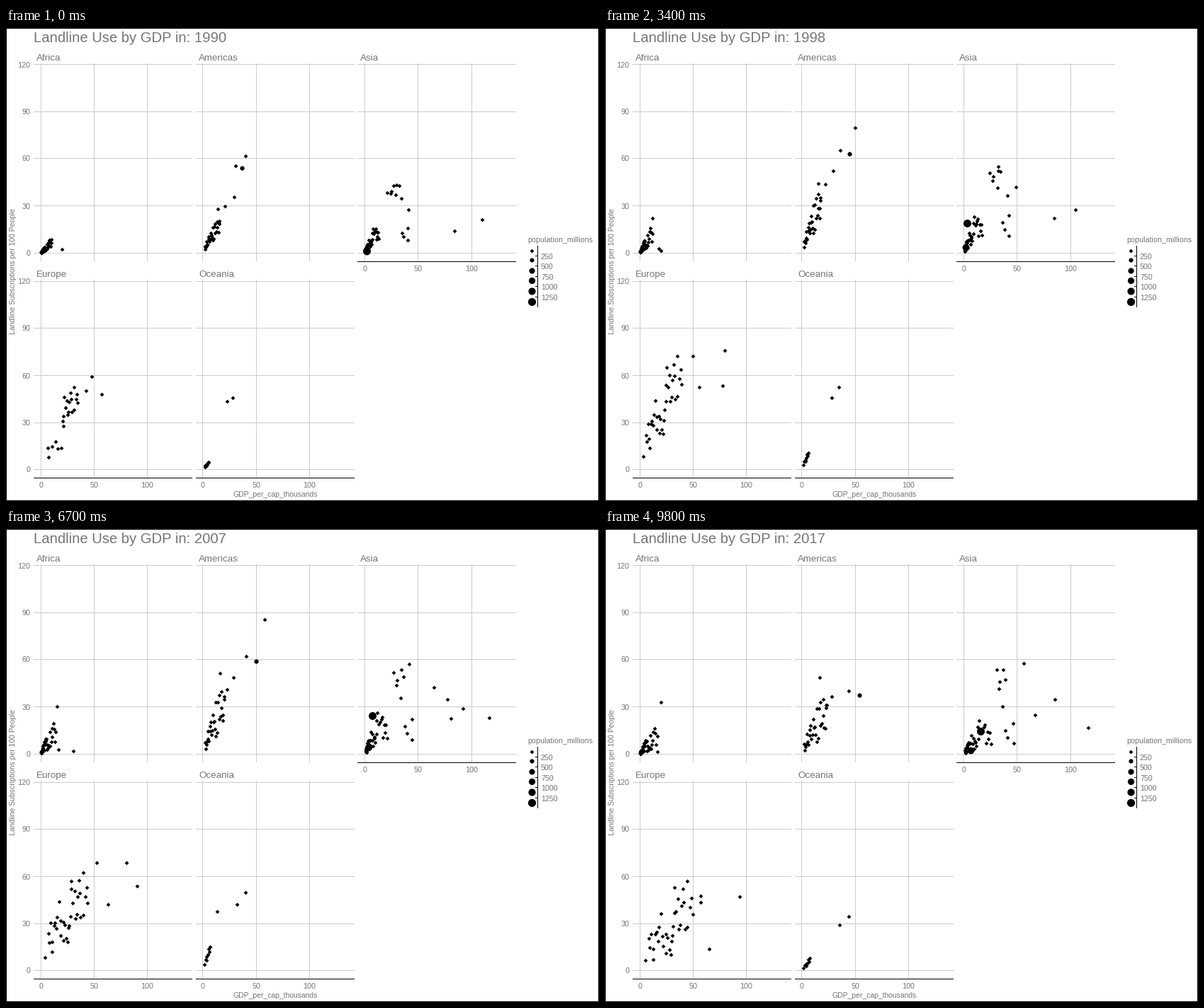
Recreate the animation shown at these times as a matplotlib script. Size 837x669 px, loop 10 s.

```python
import numpy as np
import matplotlib.pyplot as plt
from matplotlib.animation import FuncAnimation

W, H, DPI = 837, 669, 64
PX = 72 / DPI
GREY, GRID = "#757575", "#cccccc"
X_SCALE, Y_SCALE = 1.505, 2.222
KEY_YEARS = (1990, 1998.5, 2007, 2017)

# Left edge, top edge, x of zero GDP, y of zero lines, has an x axis
PANELS = {
    "Africa": (39, 50, 49.2, 318.05, False),
    "Americas": (268, 50, 277.8, 318.05, False),
    "Asia": (496, 50, 506.6, 318.05, True),
    "Europe": (39, 356, 49.2, 624.9, True),
    "Oceania": (268, 356, 277.8, 624.9, True),
}


def year_at(frame):
    """Hold each year, with one half-way step before the next."""
    if frame < 70:
        return 1990 + (frame + 2) // 4 - 0.5 * (frame % 4 == 2)
    step, part = divmod(frame - 70, 3)
    return 2008 + step - 0.5 * (part == 0)


def progress(year):
    return (year - 1990) / 27


def cloud(panel, seed, n, gdp, level, spread, power=1.0, first=1990):
    """Countries whose landlines level off with GDP.

    gdp is the range (low, high) in 1990 and in 2017; level is the
    ceiling of landlines in each key year.
    """
    rng = np.random.default_rng(seed)
    rank = ((np.arange(n) + rng.random(n)) / n) ** power
    luck = rng.uniform(-1, 1, n)
    (low0, high0), (low1, high1) = gdp

    def positions(year):
        p = progress(year)
        low, high = low0 + (low1 - low0) * p, high0 + (high1 - high0) * p
        x = low + (high - low) * rank
        y = np.interp(year, KEY_YEARS, level) * (1 - np.exp(-x / 15))
        return x, y * (1 + (spread + 0.25 * p) * luck)

    return panel, first, 2017, positions


def path(panel, start, middle, end, first=1990, last=2017):
    """One country on a parabola through its places in 1990, 2004 and 2017."""
    curve = np.polyfit([0, 14, 27], [start, middle, end], 2)

    def positions(year):
        t = year - 1990
        return curve[0] * t * t + curve[1] * t + curve[2]

    return panel, first, last, positions


SMALL = [
    cloud("Africa", 3, 44, ((0.6, 10), (0.8, 17)), (13, 21, 22, 16), 0.5, 2.6),
    path("Africa", (10, 9), (14, 28), (20, 33)),
    path("Africa", (20, 2.5), (17, 3), (16.5, 1.4)),
    path("Africa", (2, 0.5), (28, 1.8), (34, 1.8), last=2015),

    cloud("Americas", 5, 30, ((2.2, 16), (2.5, 24)), (26, 42, 40, 31), 0.35, 1.3),
    cloud("Americas", 2, 3, ((14, 31), (20, 29)), (38, 54, 49, 36), 0.2),
    path("Americas", (14.5, 28), (16, 50), (17, 49)),
    path("Americas", (31, 55.5), (39.5, 65), (44, 40.5)),
    path("Americas", (40.5, 62), (55.5, 85), (66, 78), last=2012),

    cloud("Asia", 7, 34, ((1.2, 14), (1.5, 27)), (26, 31, 29, 20), 0.5, 1.9),
    cloud("Asia", 1, 6, ((20, 34), (30, 40)), (48, 57, 53, 50), 0.1),
    cloud("Asia", 4, 4, ((33, 43), (36, 50)), (13, 19, 17, 14), 0.5),
    path("Asia", (27, 43), (38, 56), (56.5, 58)),
    path("Asia", (34.5, 35), (59, 43), (85.5, 35)),
    path("Asia", (110, 21.6), (97.6, 29), (67, 25)),
    path("Asia", (84, 14), (83, 23.5), (70, 14), last=2016),
    path("Asia", (41, 27.5), (60.5, 37), (168, 18.4), last=2014),
    path("Asia", (104, 34), (116, 25), (117, 17), first=2000),

    cloud("Europe", 6, 16, ((20, 35), (30, 50)), (52, 66, 53, 45), 0.22),
    cloud("Europe", 9, 7, ((4.5, 22), (8, 33)), (30, 52, 46, 30), 0.35),
    cloud("Europe", 8, 13, ((2, 20), (5, 32)), (34, 54, 47, 34), 0.3, first=1992),
    path("Europe", (57.5, 48.5), (87, 54.6), (94, 47.5)),
    path("Europe", (43, 50.5), (61.5, 47.7), (65, 14)),
    path("Europe", (48, 59.7), (51.5, 72), (57.5, 44)),
    path("Europe", (60, 74), (82.5, 72.5), (57.5, 48), first=1997),

    cloud("Oceania", 2, 8, ((2, 6), (1.8, 8.5)), (16, 30, 38, 18), 0.2),
    path("Oceania", (28.3, 46.2), (38.5, 52), (44.5, 35)),
    path("Oceania", (23, 43.8), (31, 44.5), (36, 29.5)),
    path("Oceania", (12, 43), (13.5, 39.4), (12.6, 33), first=2000, last=2016),
]
LARGE = [
    path("Americas", (37, 54), (48.5, 61.5), (54, 37)),
    path("Asia", (1.8, 0.9), (3, 4.2), (6.6, 2.2)),
    path("Asia", (2, 1), (5.3, 23.7), (16, 14)),
]
LARGE_RADII = (3.1, 4.9, 5.5)


def pixels(groups, year):
    """Centres of the whole pixels where the groups stand in this year."""
    spots = []
    for panel, first, last, positions in groups:
        if first <= year <= last:
            x, y = positions(year)
            _, _, x0, y0, _ = PANELS[panel]
            spots.append(np.column_stack([x0 + np.atleast_1d(x) * X_SCALE,
                                          y0 - np.atleast_1d(y) * Y_SCALE]))
    return np.floor(np.concatenate(spots)) + 0.5


fig = plt.figure(figsize=(W / DPI, H / DPI), dpi=DPI, facecolor="white")
ax = fig.add_axes([0, 0, 1, 1])
ax.set(xlim=(0, W), ylim=(H, 0))
ax.axis("off")


def line(x0, y0, x1, y1, color=GRID, z=1):
    ax.plot([x0, x1], [y0, y1], color=color, lw=PX, zorder=z,
            solid_capstyle="butt", snap=False)


def text(x, y, s, px, ha="left", va="baseline", **kw):
    return ax.text(x, y, s, fontsize=px * PX, color=GREY, ha=ha, va=va,
                   family="Liberation Sans", **kw)


def diamonds(spots):
    return ax.scatter(*spots.T, s=(4.1 * PX) ** 2, marker="D", color="black",
                      linewidths=0, zorder=3, snap=False)


def circles(spots, radii):
    return ax.scatter(*spots.T, s=(2 * np.array(radii) * PX) ** 2, color="black",
                      linewidths=0, zorder=3, snap=False)


for name, (left, top, x0, y0, has_axis) in PANELS.items():
    right, bottom = left + 224, top + 280
    for value in range(0, 121, 30):
        y = np.floor(y0 - value * Y_SCALE) + 0.5
        line(left, y, right, y)
        if left < 100:
            text(34.5, y + 4, str(value), 10.8, ha="right")
    for value in (0, 50, 100):
        x = np.floor(x0 + value * X_SCALE) + 0.5
        line(x, top, x, bottom)
        if has_axis:
            text(x, bottom + 13.5, str(value), 10.8, ha="center")
    if has_axis:
        line(left, bottom + 0.5, right, bottom + 0.5, "black", 2)
    text(left + 4, top - 4, name, 13.4)

for edge in ((0, 0.5, W, 0.5), (0, H - 0.5, W, H - 0.5),
             (0.5, 0, 0.5, H), (W - 0.5, 0, W - 0.5, H)):
    line(*edge, "black")

text(380, 663, "GDP_per_cap_thousands", 10.4, ha="center")
text(10, 343.5, "Landline Subscriptions per 100 People", 10.35,
     ha="center", va="center", rotation=90)

text(736, 303, "population_millions", 10.65)
line(750.5, 308, 750.5, 395, "black")
for k, label in enumerate((250, 500, 750, 1000, 1250)):
    y = np.floor(322 + 14.5 * k) + 0.5
    line(747, y, 751, y, "black")
    text(755, y + 4.5, str(label), 10.6)
legend = np.column_stack([np.full(6, 742.5),
                          np.floor(314 + 14.6 * np.arange(6)) + 0.5])
diamonds(legend[:1])
circles(legend[1:], (3.1, 4.1, 4.6, 5.1, 5.6))

title = text(39, 20.5, "", 20.2)
small = diamonds(pixels(SMALL, 1990))
large = circles(pixels(LARGE, 1990), LARGE_RADII)


def update(frame):
    year = year_at(frame)
    small.set_offsets(pixels(SMALL, year))
    large.set_offsets(pixels(LARGE, year))
    title.set_text(f"Landline Use by GDP in: {int(year)}")
    return small, large, title


anim = FuncAnimation(fig, update, frames=100, interval=100, repeat=True,
                     repeat_delay=0, blit=False)
plt.show()
```
